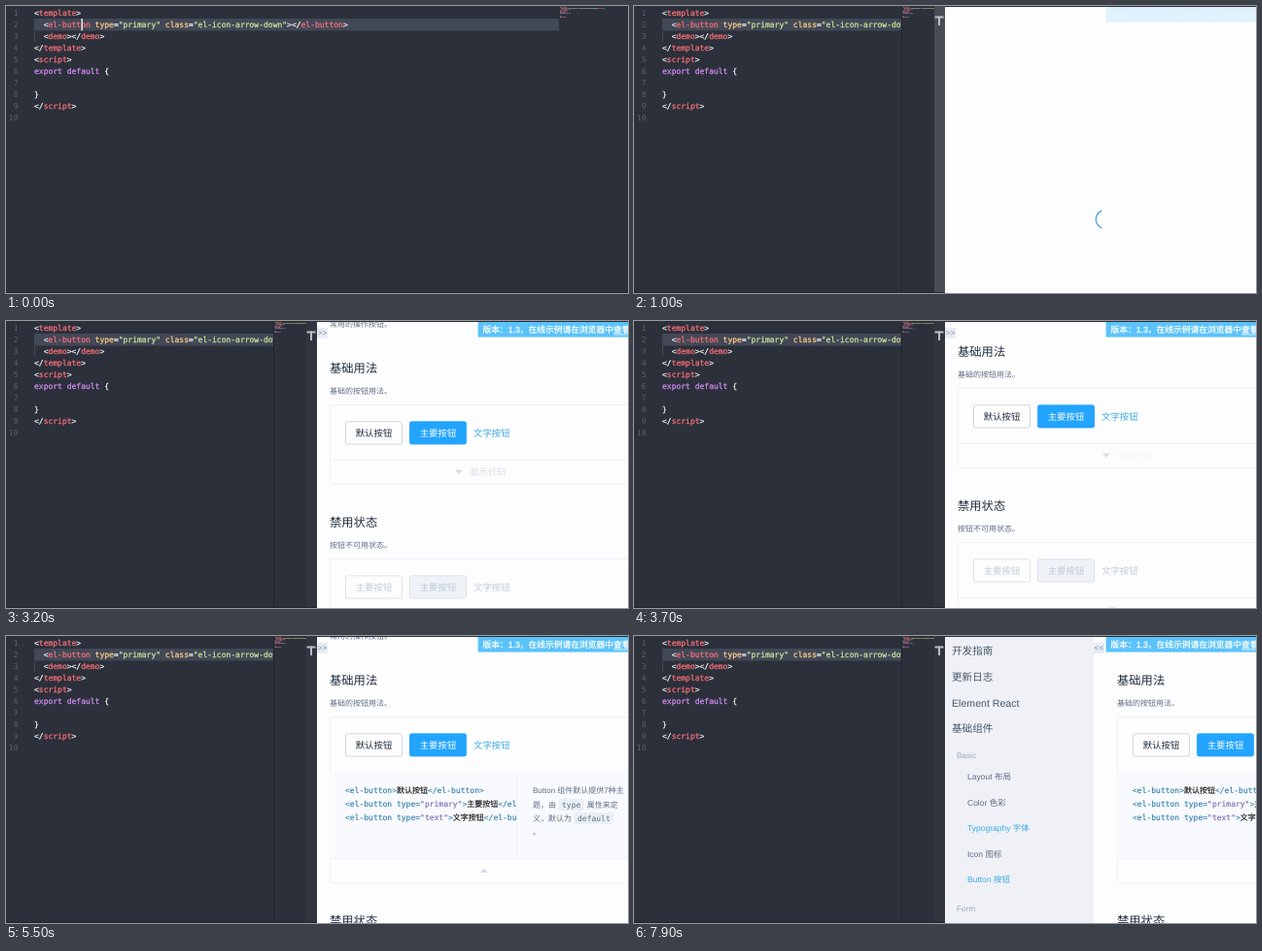
Recreate the animation shown at these times as an HTML page with a canvas. Size 640x296 px, loop 8 s.

```html
<!DOCTYPE html>
<html lang="zh-CN">
<head>
<meta charset="utf-8">
<title>Editor and docs preview</title>
<style>
html, body { margin: 0; width: 100%; height: 100%; overflow: hidden; background: #2b303b; }
canvas { display: block; width: 640px; height: 296px; }
</style>
</head>
<body>
<canvas id="stage"></canvas>
<script>
const W = 640, H = 296, LOOP = 8000, STEP = 100;
const SANS = '"Liberation Sans", "Noto Sans CJK SC", "Noto Sans CJK", sans-serif';
const MONO = '"DejaVu Sans Mono", "Noto Sans CJK SC", "Noto Sans CJK", monospace';
const canvas = document.getElementById('stage');
const ctx = canvas.getContext('2d');
const dpr = window.devicePixelRatio || 1;
canvas.width = W * dpr;
canvas.height = H * dpr;

const C = {
  bg: '#2b303b', active: '#434857', edge: '#20242c', num: '#5b606c',
  plain: '#f4f5f7', tag: '#f76f77', attr: '#fccb85', str: '#c8e69a', key: '#d38cf0',
  page: '#fefdfe', title: '#1f2d3d', body: '#5e6d82', blue: '#22a4ff', link: '#3ba9e6',
  border: '#eaeefb', mute: '#d3dce6', off: '#bfcbd9', soft: '#f8fafd'
};

// Token runs: [colour, text]
const SOURCE = [
  [['plain', '<'], ['tag', 'template'], ['plain', '>']],
  [['plain', '  <'], ['tag', 'el-button'], ['attr', ' type'], ['plain', '='], ['str', '"primary"'],
   ['attr', ' class'], ['plain', '='], ['str', '"el-icon-arrow-down"'],
   ['plain', '></'], ['tag', 'el-button'], ['plain', '>']],
  [['plain', '  <'], ['tag', 'demo'], ['plain', '></'], ['tag', 'demo'], ['plain', '>']],
  [['plain', '</'], ['tag', 'template'], ['plain', '>']],
  [['plain', '<'], ['tag', 'script'], ['plain', '>']],
  [['key', 'export default'], ['plain', ' {']],
  [],
  [['plain', '}']],
  [['plain', '</'], ['tag', 'script'], ['plain', '>']],
  []
];

// Piecewise linear value at time t
function at(t, ...keys) {
  if (t <= keys[0][0]) return keys[0][1];
  for (let i = 1; i < keys.length; i++) {
    const [a, u] = keys[i - 1], [b, v] = keys[i];
    if (t <= b) return u + (v - u) * (t - a) / (b - a);
  }
  return keys[keys.length - 1][1];
}

function rect(x, y, w, h, color) {
  ctx.fillStyle = color;
  ctx.fillRect(x, y, w, h);
}

// y is the middle of the line; weight thickens the strokes; returns the x after the text
function text(s, x, y, size, color, font = SANS, align = 'left', weight = 0) {
  ctx.font = `${size}px ${font}`;
  ctx.textAlign = align;
  ctx.fillStyle = color;
  ctx.fillText(s, x, y + size * 0.36);
  if (weight) {
    ctx.strokeStyle = color;
    ctx.lineWidth = weight;
    ctx.lineJoin = 'round';
    ctx.strokeText(s, x, y + size * 0.36);
  }
  return x + ctx.measureText(s).width;
}

function box(x, y, w, h, r, fill, stroke) {
  ctx.beginPath();
  ctx.roundRect(x, y, w, h, r);
  if (fill) { ctx.fillStyle = fill; ctx.fill(); }
  if (stroke) { ctx.strokeStyle = stroke; ctx.lineWidth = 0.8; ctx.stroke(); }
}

function clipped(x, y, w, h, draw) {
  ctx.save();
  ctx.beginPath();
  ctx.rect(x, y, w, h);
  ctx.clip();
  draw();
  ctx.restore();
}

function runs(list, x, y, palette, weight) {
  for (const [c, s] of list) x = text(s, x, y, 8, palette[c], MONO, 'left', weight);
}

function minimap(x, right) {
  clipped(x, 0, right - x, 20, () => {
    ctx.globalAlpha = 0.6;
    SOURCE.forEach((line, i) => {
      let cx = x + 1;
      for (const [c, s] of line) {
        const lead = s.length - s.trimStart().length;
        rect(cx + lead * 0.68, 0.8 + i * 1.3, (s.length - lead) * 0.68, 0.8, C[c]);
        cx += s.length * 0.68;
      }
    });
  });
}

function editor(t, split) {
  const right = split ? 275 : 569;
  rect(0, 0, W, H, C.bg);
  rect(29, 13, right - 29, 12.5, C.active);
  rect(29, 26, 0.8, 11, '#4a4f5b');
  clipped(0, 0, right, H, () => SOURCE.forEach((line, i) => {
    const y = 7.2 + i * 12;
    text(String(i + 1), 12.5, y, 8, C.num, MONO, 'right');
    runs(line, 29, y, C, 0.25);
  }));
  if (!split) rect(77.5, 13, 1.3, 12.5, '#fff');
  minimap(split ? 275.5 : 569, split ? 309 : W);
  if (split) {
    rect(275, 0, 1, H, C.edge);
    const lit = at(t, [1000, 1], [1500, 0]);
    rect(309, 0, 11, H, `rgba(92,96,106,${0.1 + 0.5 * lit})`);
    rect(309.5, 10.5, 9, 2, '#b9bcc2');
    rect(313, 10.5, 2, 9.5, '#b9bcc2');
  }
  rect(0, 295, W, 1, C.edge);
}

function button(label, x, y, fill, stroke, color) {
  box(x + 0.4, y + 0.4, 58.2, 23.2, 2, fill, stroke);
  text(label, x + 29.5, y + 12, 9.4, color, SANS, 'center');
}

function arrow(x, y, up, color) {
  const d = up ? -1 : 1;
  ctx.beginPath();
  ctx.moveTo(x - 4, y - 2 * d);
  ctx.lineTo(x + 4, y - 2 * d);
  ctx.lineTo(x, y + 2.4 * d);
  ctx.fillStyle = color;
  ctx.fill();
}

function control(x, y, hover, up, color) {
  arrow(x + 159 - 26 * hover, y, up, color);
  if (hover <= 0) return;
  ctx.globalAlpha = hover;
  text(up ? '隐藏代码' : '显示代码', x + 163 + 26 * (1 - hover), y, 9.4, color, SANS, 'center');
  ctx.globalAlpha = 1;
}

function pill(s, x, y) {
  ctx.font = `8px ${MONO}`;
  const w = ctx.measureText(s).width;
  box(x, y - 6, w + 7, 12, 2, '#e9eff6');
  text(s, x + 3.5, y, 8, C.body, MONO);
  return x + w + 7;
}

function snippet(x, y, h) {
  const ink = { tag: '#2f7bab', str: '#756bb1', text: '#111' };
  const row = (type, label) => [
    ['tag', '<el-button' + (type ? ' type=' : '')], ['str', type], ['tag', '>'],
    ['text', label], ['tag', '</el-button>']
  ];
  clipped(x, y, 318, h, () => {
    rect(x, y, 318, 90, C.soft);
    rect(x + 192, y, 0.8, 90, C.border);
    clipped(x, y, 192, 90, () => {
      runs(row('', '默认按钮'), x + 16, y + 19, ink, 0.12);
      runs(row('"primary"', '主要按钮'), x + 16, y + 33, ink, 0.12);
      runs(row('"text"', '文字按钮'), x + 16, y + 47, ink, 0.12);
    });
    const dx = x + 209;
    text('Button 组件默认提供7种主', dx, y + 19, 8, C.body);
    let e = text('题，由', dx, y + 34, 8, C.body);
    e = pill('type', e + 2.5, y + 34);
    text('属性来定', e + 3, y + 34, 8, C.body);
    e = text('义，默认为', dx, y + 48, 8, C.body);
    pill('default', e + 2.5, y + 48);
    text('。', dx, y + 62, 8, C.body);
  });
}

function section(x, y, name, note, disabled, s) {
  text(name, x, y + 0.3, 12.3, C.title);
  text(note, x, y + 24, 8, C.body);
  box(x + 0.4, y + 38.4, 318, 82 + s.open, 2, C.page, C.border);
  const by = y + 55.4;
  if (disabled) {
    button('主要按钮', x + 16, by, C.page, C.mute, C.off);
    button('主要按钮', x + 82, by, '#eff2f7', C.mute, C.off);
  } else {
    button('默认按钮', x + 16, by, C.page, '#c0ccda', C.title);
    button('主要按钮', x + 82, by, C.blue, C.blue, '#fff');
  }
  text('文字按钮', x + 148, by + 12, 9.4, disabled ? C.off : C.link);
  if (s.open > 0) snippet(x, y + 95, s.open);
  const cy = y + 95 + s.open;
  if (s.hot) rect(x + 1, cy, 316, 25, C.soft);
  rect(x, cy, 318, 0.8, C.border);
  control(x, cy + 12.4, s.hover, s.open > 44, s.hot ? C.blue : C.mute);
}

function sidebar(x, t) {
  rect(x, 1, 153, H, '#eff1f7');
  ['开发指南', '更新日志', 'Element React', '基础组件'].forEach((s, i) =>
    text(s, x + 7, 15.3 + i * 26.7, 10.6, '#475669'));
  text('Basic', x + 12, 123, 8.2, '#99a9bf');
  ['Layout 布局', 'Color 色彩', 'Typography 字体', 'Icon 图标', 'Button 按钮'].forEach((s, i) => {
    const lit = i === 4 || (i === 2 && t >= 7500);
    text(s, x + 23, 145 + i * 26.6, 8.5, lit ? C.link : C.body);
  });
  text('Form', x + 12, 281, 8.2, '#99a9bf');
}

function docs(t) {
  const y = at(t, [2800, 82], [3200, 48], [3500, 46], [3700, 31], [3900, 31], [4300, 45]);
  const open = at(t, [4600, 0], [4900, 89.5]);
  const hover = at(t, [2900, 0], [3200, 1], [3500, 1], [3700, 0.23], [3800, 0],
    [4200, 0], [4400, 1], [5100, 1], [5400, 0]);
  const slide = at(t, [6400, 0], [6600, 0.5], [6800, 1]);
  const x = 333 + 164 * slide;
  text('Button 按钮', x, y - 71, 15.6, C.title);
  text('常用的操作按钮。', x, y - 45, 8, C.body);
  section(x, y, '基础用法', '基础的按钮用法。', false, { open, hover, hot: t >= 4400 && t < 5100 });
  section(x, y + 159 + open, '禁用状态', '按钮不可用状态。', true, { open: 0, hover: 0, hot: false });
  if (slide > 0) sidebar(320 - 153 * (1 - slide), t);
  const hx = 320 + 153 * Math.min(1, slide * 1.26);
  const hy = 12.3 + 3 * Math.sin(Math.PI * slide);
  rect(hx, hy - 5.5, 11, 11, '#e8ecf4');
  text(slide > 0 ? '<<' : '>>', hx + 5.5, hy, 8.4, '#8492a6', SANS, 'center');
}

function spinner(t) {
  const mid = Math.PI + (t - 1000) / 1000 * Math.PI * 2;
  ctx.beginPath();
  ctx.arc(484.7, 220, 9.5, mid - 1.18, mid + 1.18);
  ctx.strokeStyle = '#4aa3d8';
  ctx.lineWidth = 1.3;
  ctx.lineCap = 'round';
  ctx.stroke();
}

function banner(alpha) {
  ctx.globalAlpha = alpha;
  rect(485.6, 1, 155, 15.6, '#5bc3fa');
  const e = text('版本：1.3，在线示例请在浏览器中', 490.4, 9, 8.75, '#fff', SANS, 'left', 0.25);
  const end = text('查看', e, 9, 8.75, '#fff', SANS, 'left', 0.25);
  rect(e, 13.6, end - e, 0.8, '#fff');
  ctx.globalAlpha = 1;
}

function draw(t) {
  ctx.setTransform(dpr, 0, 0, dpr, 0, 0);
  ctx.textRendering = 'geometricPrecision';
  const split = t >= 600;
  editor(t, split);
  if (!split) return;
  clipped(320, 1, 320, 295, () => {
    rect(320, 1, 320, 295, C.page);
    if (t >= 2100) docs(t);
    else if (t >= 800) spinner(t);
    banner(at(t, [900, 0], [1000, 0.2], [1400, 1]));
  });
}

const start = performance.now();
function tick(now) {
  const t = Math.max(0, now - start) % LOOP;
  draw(Math.floor(t / STEP) * STEP);
  requestAnimationFrame(tick);
}
draw(0);
requestAnimationFrame(tick);
</script>
</body>
</html>
```
